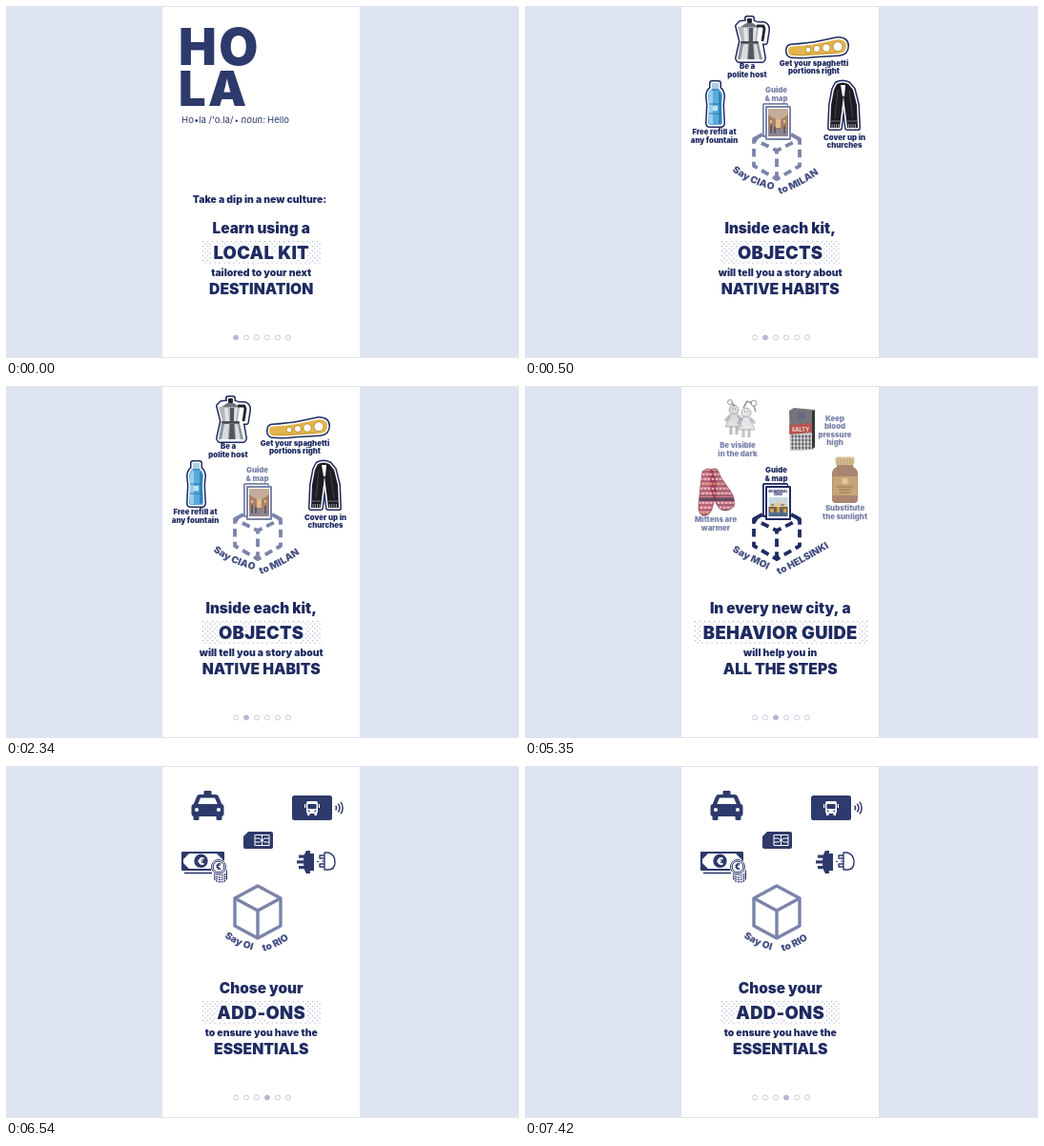
Write an HTML page with a canvas that moves like this. It is 538 by 370 pixels and loops after 8 s.

```html
<!DOCTYPE html>
<html lang="en">
<head>
<meta charset="utf-8">
<title>Travel kit onboarding</title>
<style>
html, body { margin: 0; width: 100%; height: 100%; overflow: hidden; background: #dde3f1; }
canvas { display: block; width: 538px; height: 370px; }
</style>
</head>
<body>
<canvas id="stage"></canvas>
<script>
const canvas = document.getElementById('stage');
const ctx = canvas.getContext('2d');
const ratio = window.devicePixelRatio || 1;
canvas.width = 538 * ratio;
canvas.height = 370 * ratio;

const NAVY = '#1f2b61', INK = '#2d3a6b', PALE = '#7b84aa', SLOGAN = '#475283', WHITE = '#fff';
const LOOP = 8000;

// Drawing helpers
function fill(path, color) {
  ctx.fillStyle = color;
  ctx.fill(new Path2D(path));
}
function line(path, color, width = 1) {
  ctx.strokeStyle = color;
  ctx.lineWidth = width;
  ctx.stroke(new Path2D(path));
}
function box(x, y, w, h, color, r = 0) {
  ctx.fillStyle = color;
  ctx.beginPath();
  ctx.roundRect(x, y, w, h, r);
  ctx.fill();
}
function disc(x, y, r, color, ring) {
  ctx.beginPath();
  ctx.arc(x, y, r, 0, Math.PI * 2);
  if (color) { ctx.fillStyle = color; ctx.fill(); }
  if (ring) { ctx.strokeStyle = ring; ctx.lineWidth = 1; ctx.stroke(); }
}
function text(str, x, y, size, { color = NAVY, align = 'center', style = '900', halo = 0, spacing = 0 } = {}) {
  ctx.font = `${style} ${size}px Inter, sans-serif`;
  ctx.textAlign = align;
  ctx.letterSpacing = `${spacing}px`;
  if (halo) {
    ctx.strokeStyle = WHITE;
    ctx.lineWidth = halo;
    ctx.strokeText(str, x, y);
  }
  ctx.fillStyle = color;
  ctx.fillText(str, x, y);
  ctx.letterSpacing = '0px';
}
function label(lines, x, y, color = NAVY) {
  lines.forEach((str, i) => text(str, x, y + i * 8.6, 7.8, { color }));
}
function faded(alpha, draw) {
  ctx.save();
  ctx.globalAlpha = alpha;
  draw();
  ctx.restore();
}
function clipped(path, draw) {
  ctx.save();
  ctx.clip(new Path2D(path));
  draw();
  ctx.restore();
}
// White-edged cut-out with a navy contour
function sticker(path) {
  line(path, NAVY, 6);
  line(path, WHITE, 3);
  fill(path, WHITE);
}
// Letters whose slope turns from one angle (degrees) to another
function bentText(str, x, y, from, to) {
  ctx.font = '900 10.2px Inter, sans-serif';
  ctx.textAlign = 'left';
  ctx.fillStyle = SLOGAN;
  [...str].forEach((char, i) => {
    const angle = (from + (to - from) * i / (str.length - 1)) * Math.PI / 180;
    const step = ctx.measureText(char).width;
    ctx.save();
    ctx.translate(x, y);
    ctx.rotate(angle);
    ctx.fillText(char, 0, 0);
    ctx.restore();
    x += step * Math.cos(angle);
    y += step * Math.sin(angle);
  });
}

// Shared layout
function dottedBand(left, right) {
  ctx.fillStyle = '#adb5d1';
  for (let row = 0; row < 10; row++) {
    for (let x = left + (row % 2) * 2.5; x < right; x += 5) {
      ctx.fillRect(x, 247 + row * 2.5, 1.2, 1.2);
    }
  }
}
function headline([first, title, third, last], left = 206, right = 331) {
  const middle = 267.7;
  dottedBand(left, right);
  text(first, middle, 239, 15.3);
  text(title, middle, 265.5, 18.4, { halo: 5, spacing: 0.3 });
  text(third, middle, 284, 10.45);
  text(last, middle, 302.7, 15.7);
}
function pager(active) {
  for (let i = 0; i < 6; i++) {
    const on = i === active;
    disc(241 + i * 11, 348.5, 2.5, on ? '#b3b9d0' : null, on ? '#b3b9d0' : '#c6cbdd');
  }
}
// Dashes sized so that each edge starts and ends on half a dash
function openBox(color) {
  ctx.setLineDash([8.5, 5.2]);
  ctx.lineDashOffset = 4.25;
  line('M264 152L240 140V168L264 182L288 168V140L264 152V182', color, 3.8);
  ctx.setLineDash([]);
  ctx.lineDashOffset = 0;
  line('M240 140L249 135M288 140L279 135', color, 3.8);
}
function book(color, drawPicture) {
  box(249, 102, 27, 36, color, 1.5);
  box(250.8, 103.8, 24, 32, WHITE);
  box(252, 105, 27, 36, color, 1);
  box(254, 107, 23, 32, WHITE);
  drawPicture();
}

// First kit
function mokaPot() {
  sticker('M233 13h5v4l6 2h6q4 1 4 6l-2 13h-5l3 17-1 2h-25l-1-2 4-18-4-16 3-3 8-1z');
  fill('M226 39h19l4 17h-26z', '#8c9299');
  fill('M223 22h22l-2 15h-16z', '#b2b6bb');
  fill('M226 22l6-4h7l6 4z', '#70757c');
  fill('M229 40h5l-1 16h-7zM240 40h3l3 16h-5z', '#d9dcdf');
  fill('M229 23h4l1 14h-4zM240 23h3l-2 14h-2z', '#e3e5e7');
  fill('M235 40h4l1 16h-6zM235 23h4v14h-4z', '#53575d');
  box(226, 37, 19, 2.5, '#4b4f55', 1);
  box(233, 13, 5, 5, '#22252b', 1);
  line('M243 21h7l1 3-2 13', '#22252b', 2.8);
}
function pastaMeasure() {
  const shape = 'M279 42.5q18-1 30-3.5l19-4q9 0 9 7t-8 8l-26 1.5q-12 1.5-24 .5-3-1-3-5t3-4.5z';
  sticker(shape);
  fill(shape, '#e2b64e');
  line('M280 51q22 1 46-2', '#c99836', 1);
  [[297, 46, 3], [306, 45, 3.6], [316, 44, 4.2], [328, 42.6, 5]]
    .forEach(([x, y, r]) => disc(x, y, r, WHITE, '#bd8e35'));
}
function waterBottle() {
  const shape = 'M196 81h7v6q4 3 4 8l-1 9 1 19q0 2-2 2h-11q-2 0-2-2l1-19-1-9q0-5 4-8z';
  sticker(shape);
  fill(shape, '#5aaade');
  box(196, 81, 7, 6, '#a9cfe5', 1);
  fill('M193 92q2-3 4-4v36h-4z', '#98d0ee');
  fill('M203 89l3 4v30l-3 1z', '#3182bc');
  line('M193 103h13M193 113h13M196 88h7', '#2b76ae', 1);
  box(197, 105, 5, 5, '#c2e3f3');
}
function scarf() {
  const shape = 'M327 82q6-3 12 0l5 6 4 16 1 24h-11l-4-33-4 33h-10l1-24 3-16z';
  sticker(shape);
  fill(shape, '#1d1c22');
  fill('M331 83h5l-1 12h-2z', WHITE);
  line('M328 88l-3 30M340 89l4 29', '#44444d', 1);
  for (let i = 0; i < 4; i++) {
    line(`M${322 + i * 2.3} 124v5M${339.5 + i * 2.3} 124v5`, '#c5c5ca', 0.8);
  }
  line('M321 121h9M338 121h10', '#777780', 1);
}
function galleryCover() {
  box(255, 108, 21, 29, '#947c75');
  fill('M255 108h21v8l-10 4-11-4z', '#c4ad98');
  fill('M255 114l8 6v9l-8 4zM276 114l-8 6v9l8 4z', '#a9806c');
  box(263, 119, 5, 9, '#e3bd87');
  box(255, 130, 21, 7, '#908590');
  fill('M257 125h2v9h-2zM261 127h2v7h-2zM271 126h2v8h-2z', '#5b5c70');
  line('M258 120v3M272 120v3', '#f0cf91', 1.5);
}

// Second kit
function reflectors() {
  const figure = (x, y, tone) => {
    const dress = `M${x - 3} ${y + 4}h6l6 14h-18z`;
    line(`M${x - 4} ${y + 6}l-5 6M${x + 4} ${y + 6}l5 5M${x - 3} ${y + 17}v9M${x + 3} ${y + 17}v9`, '#8d8f93', 3);
    line(`M${x - 4} ${y + 6}l-5 6M${x + 4} ${y + 6}l5 5M${x - 3} ${y + 17}v9M${x + 3} ${y + 17}v9`, tone, 1.6);
    disc(x, y, 5, tone, '#8d8f93');
    fill(dress, tone);
    line(dress, '#8d8f93', 0.8);
    line(`M${x - 4} ${y + 12}h8M${x - 5} ${y + 15}h10`, '#f3f4f5', 1);
    line(`M${x - 2} ${y - 1}h1M${x + 1} ${y - 1}h1`, '#555', 1);
  };
  figure(219, 25, '#c6c8ca');
  figure(232, 28, '#d3d5d7');
  disc(215, 17, 2.5, null, '#666');
  disc(240, 18, 3, null, '#666');
  line('M229 23l4-7 5 2M240 21l2 6M217 18l3 3', '#666', 1.6);
}
function candyBox() {
  fill('M277 26l5-3 22 2v39l-4 3-22 1z', '#2b2b30');
  fill('M301 27l3-2v39l-3 3z', '#151519');
  box(286, 27, 8, 8, '#5c6387');
  fill('M277 41l24-2v10l-24 2z', '#d8433c');
  text('SALTY', 289, 47.5, 5.5, { color: WHITE });
  fill('M277 51l24-2v18l-23 1z', WHITE);
  for (let row = 0; row < 4; row++) {
    for (let col = 0; col < 6; col++) {
      fill(`M${280.5 + col * 3.6} ${51 + row * 4}l1.5 2-1.5 2-1.5-2z`, '#2b2b30');
    }
  }
}
function mittens() {
  const right = 'M194 89q4-4 8-1l4 9 10 14q5 9 3 16-8 7-15 2-7-9-9-20z';
  const left = 'M186 90q5-5 10-2l4 12v14l-4 16q-4 8-10 6-5-3-4-11l2-20z';
  [right, left].forEach((shape, n) => {
    fill(shape, n ? '#c24157' : '#b13a50');
    clipped(shape, () => {
      for (let y = 87; y < 138; y += 5) {
        box(180, y + 2.5, 42, 1.2, '#6d3350');
        for (let x = 182 + (y % 2) * 2; x < 221; x += 4) {
          box(x, y, 2, 2, y % 3 ? '#f1d5d6' : '#e7b35e');
        }
      }
      box(180, 117, 42, 4, '#3a3758');
    });
    line(shape, '#6d2b40', 0.8);
  });
}
function pillBottle() {
  fill('M327 83h17v2q5 2 5 7v27q0 4-4 4h-19q-4 0-4-4v-27q0-5 5-7z', '#7d4527');
  box(325.5, 74.5, 20, 8.5, '#c3a062', 2);
  for (let x = 328; x < 345; x += 2.5) line(`M${x} 76.5v6`, '#927543', 0.7);
  box(322.5, 95, 26, 20, '#d9b57c');
  disc(335.5, 100, 3.4, '#f0d8a5');
  line('M327 106h17M329 109h13M330 112h11', '#7a5330', 0.9);
  line('M325.5 88v6M325.5 116v4', '#c08a62', 1.5);
}
function harbourCover() {
  text('BEHAVIORAL', 265.5, 111.5, 3);
  text('GUIDE', 265.5, 115, 3);
  box(255.5, 117, 20, 20, '#c8d9e6');
  fill('M255.5 126l4-3h4l2-4 3 4h3l4 3v6h-20z', '#dccdb0');
  box(255.5, 127, 20, 4, '#79604e');
  box(255.5, 131, 20, 6, '#4d6a8c');
  fill('M257 129h4v4h-4zM264 127h3v6h-3zM271 129h3v4h-3z', '#d5a24a');
  line('M258 125h3M268 125h4', '#5b4d4a', 1);
}

// Add-on icons
function taxi() {
  box(207.5, 26, 8, 5, INK, 1);
  fill('M203 30h17q2 0 3 2l4 10h-31l4-10q1-2 3-2z', INK);
  fill('M204 33.5h15l3 7h-21z', WHITE);
  box(194.5, 40, 34, 13, INK, 3);
  box(196.5, 51, 6, 6, INK, 1.5);
  box(220.5, 51, 6, 6, INK, 1.5);
  disc(200, 46, 2.1, WHITE);
  disc(223, 46, 2.1, WHITE);
}
function busCard() {
  box(300, 31, 42, 26, INK, 2.5);
  box(315, 37, 12, 13, WHITE, 2);
  box(316.5, 40, 9, 5, INK, 0.5);
  box(316, 49, 2.5, 3, WHITE);
  box(323.5, 49, 2.5, 3, WHITE);
  box(313, 40, 1.2, 4, WHITE);
  box(327.8, 40, 1.2, 4, WHITE);
  disc(317.6, 47.4, 0.9, INK);
  disc(324.4, 47.4, 0.9, INK);
  [4, 7.3, 10.6].forEach(r => {
    ctx.beginPath();
    ctx.arc(342.5, 44, r, -0.65, 0.65);
    ctx.strokeStyle = INK;
    ctx.lineWidth = 1.5;
    ctx.stroke();
  });
}
function simCard() {
  fill('M254 69h24q2 0 2 2v14q0 2-2 2h-27q-2 0-2-2v-11z', INK);
  line('M261 72.5h15v11h-15zM261 76h5l2 2-2 2h-5M276 76h-5l-2 2 2 2h5M268.5 72.5v5.5M268.5 78v5.5', WHITE, 1);
}
function money() {
  box(184, 90, 45, 20, INK, 1);
  box(186, 92, 41, 16, WHITE);
  fill('M186 92h6l-6 6zM227 92h-6l6 6zM186 108h6l-6-6z', INK);
  disc(204.5, 99.8, 7.2, INK);
  text('€', 204.5, 103.7, 11, { color: WHITE });
  line('M187 112.5h29', INK, 1.6);
  for (let i = 3; i >= 0; i--) {
    ctx.beginPath();
    ctx.ellipse(225, 111 + i * 2.3, 6.5, 4, 0, 0, Math.PI * 2);
    ctx.fillStyle = WHITE;
    ctx.fill();
    ctx.strokeStyle = INK;
    ctx.lineWidth = 1.2;
    ctx.setLineDash([2, 0.8]);
    ctx.stroke();
    ctx.setLineDash([]);
  }
  disc(223, 106, 8.5, WHITE);
  disc(223, 106, 7.5, WHITE, INK);
  disc(223, 106, 5.8, null, INK);
  text('€', 223, 109.3, 9, { color: INK });
}
function plugs() {
  fill('M315 89h4v3h4v18h-4v3h-4q-3-4-3-12t3-12z', INK);
  box(307, 93.5, 8, 3.2, INK);
  box(305, 99.3, 9, 3.2, INK);
  box(307, 105, 8, 3.2, INK);
  line('M334 91h4q7 2 7 10t-7 8h-4zM334 94h-5v3h5M334 103h-5v3h5', INK, 1.4);
  line('M331 100h3M326 100.5h2', INK, 1.2);
}

// Slides
function greetingSlide() {
  const big = { color: INK, align: 'left', spacing: 2.5 };
  text('HO', 181, 62, 53, big);
  text('LA', 181, 105, 50.5, big);
  const note = { color: INK, align: 'left', style: '400' };
  text('Ho•la', 184, 123, 9.6, note);
  text("/'o.la/", 212.5, 123, 9.6, note);
  text('•', 239.5, 123, 8, note);
  text('noun:', 246.5, 123, 9.6, { ...note, style: 'italic 400' });
  text('Hello', 274, 123, 9.6, note);
  text('Take a dip in a new culture:', 266, 207, 10.45);
  headline(['Learn using a', 'LOCAL KIT', 'tailored to your next', 'DESTINATION']);
}
function objectsSlide() {
  mokaPot();
  pastaMeasure();
  waterBottle();
  scarf();
  label(['Be a', 'polite host'], 233, 66);
  label(['Get your spaghetti', 'portions right'], 303, 62.5);
  label(['Free refill at', 'any fountain'], 198.5, 135);
  label(['Cover up in', 'churches'], 335, 140.5);
  label(['Guide', '& map'], 263.5, 91, PALE);
  openBox(PALE);
  book(PALE, galleryCover);
  bentText('Say CIAO', 217, 173.5, 34, 16);
  bentText('to MILAN', 267, 198, -20, -34);
  headline(['Inside each kit,', 'OBJECTS', 'will tell you a story about', 'NATIVE HABITS']);
}
function guideSlide() {
  faded(0.65, () => {
    reflectors();
    candyBox();
    mittens();
    pillBottle();
  });
  label(['Be visible', 'in the dark'], 223, 65, PALE);
  label(['Keep', 'blood', 'pressure', 'high'], 325, 36.5, PALE);
  label(['Mittens are', 'warmer'], 200, 143, PALE);
  label(['Substitute', 'the sunlight'], 335.5, 131, PALE);
  label(['Guide', '& map'], 263.5, 91);
  openBox(NAVY);
  book(NAVY, harbourCover);
  bentText('Say MOI', 217, 173.5, 30, 25);
  bentText('to HELSINKI', 266, 198.5, -26, -31);
  headline(['In every new city, a', 'BEHAVIOR GUIDE', 'will help you in', 'ALL THE STEPS'], 178, 359);
}
function addOnsSlide() {
  taxi();
  busCard();
  simCard();
  money();
  plugs();
  line('M264 126L288 139V168L264 181L240 168V139ZM240 139L264 152L288 139M264 152V181', PALE, 3.4);
  bentText('Say OI', 229, 180, 32, 16);
  bentText('to RIO', 270, 195, -18, -32);
  headline(['Chose your', 'ADD-ONS', 'to ensure you have the', 'ESSENTIALS']);
}

const slides = [
  { start: 0, draw: greetingSlide },
  { start: 500, draw: objectsSlide },
  { start: 3570, draw: guideSlide },
  { start: 6540, draw: addOnsSlide },
];

function render() {
  const time = performance.now() % LOOP;
  const index = slides.findLastIndex(slide => time >= slide.start);
  ctx.setTransform(ratio, 0, 0, ratio, 0, 0);
  ctx.lineJoin = 'round';
  box(0, 0, 538, 370, '#dde3f1');
  box(164, 1, 207, 368, WHITE);
  slides[index].draw();
  pager(index);
  requestAnimationFrame(render);
}
render();
</script>
</body>
</html>
```
